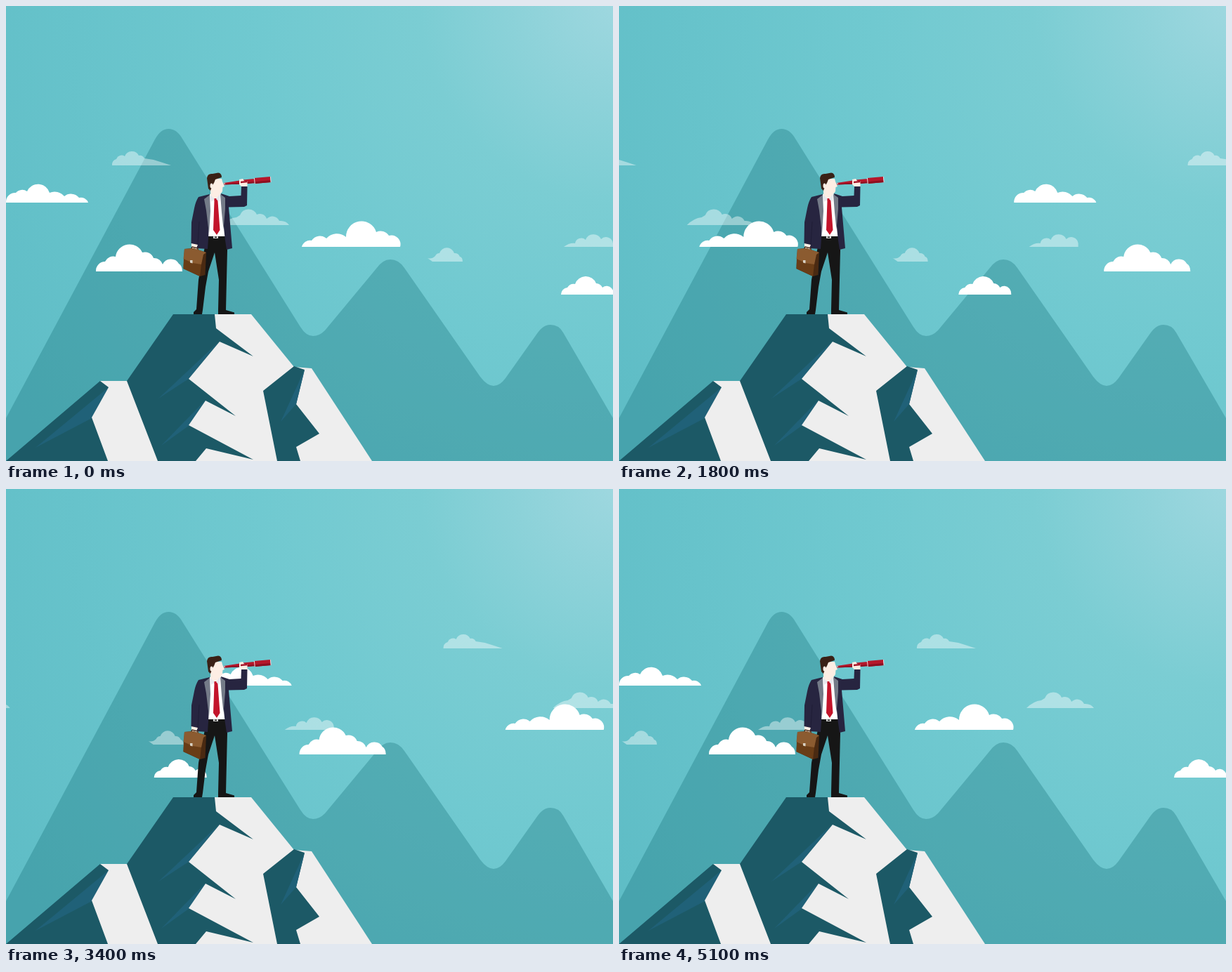
Write an HTML page that moves like this. It is 864x648 px and loops after 5.2 s.

```html
<!DOCTYPE html>
<html lang="en">
<head>
<meta charset="utf-8">
<title>Lookout</title>
<style>
html, body { margin: 0; width: 100%; height: 100%; overflow: hidden; background: #6ac4ca; }
svg { display: block; width: 100vw; height: 100vh; }
</style>
</head>
<body>
<svg viewBox="0 0 864 648" preserveAspectRatio="none">
  <defs>
    <radialGradient id="sky" gradientUnits="userSpaceOnUse" cx="880" cy="-10" r="1040">
      <stop offset="0" stop-color="#a0d8e0"/>
      <stop offset=".12" stop-color="#90d3da"/>
      <stop offset=".28" stop-color="#7bcdd3"/>
      <stop offset=".5" stop-color="#70c9d0"/>
      <stop offset=".75" stop-color="#67c3cb"/>
      <stop offset="1" stop-color="#5fbdc6"/>
    </radialGradient>
  </defs>
  <rect width="864" height="648" fill="url(#sky)"/>
  <path fill="#146e78" fill-opacity=".32" d="M0 587L212 190Q220 175 231.500 175Q243 175 251 189L419 457Q427 470 437 470Q446 470 454 462L527 374Q536 361 547 361Q559 361 567 373L675 528Q685 541 694 541Q703 541 711 530L757 465Q765 454 775 454Q787 454 793 465L864 587V648H0Z"/>
  <g id="clouds"></g>

  <g id="rock">
    <path fill="#1c5966" d="M0 648L134 534L172 534L238 439H300L352 499L446 609L420 648Z"/>
    <g fill="#206178">
      <path d="M146 543L42 629L122 587Z"/>
      <path d="M303 478L217 559L260 531Z"/>
      <path d="M283 562L221 626L260 598Z"/>
    </g>
    <g fill="#eee">
      <path d="M134 534H172L216 648H145L122 586L146 543Z"/>
      <path d="M297 439H349L410 514L435 516L521 648H270L285 630L352 646L260 597L284 562L327 584L260 531L304 478L352 499L299 459Z"/>
    </g>
    <path fill="#1c5966" d="M410 513L425 518L413 567L446 609L413 628L419 648H386L366 548Z"/>
    <path fill="#206178" d="M425 518L391 592L413 567Z"/>
  </g>

  <g id="man">
    <path fill="#161616" d="M286 327H315.500L314 390L313 433L325 436.500V439H302V433L303 390L297 351L288 378L284 400L280 433L279 439H267V436L271 432L274 390Z"/>
    <path fill="#fdeee4" d="M264 336H273L274 346L268 349L264 345Z"/>
    <path fill="#fff" d="M290 268H306L312 328H287Z"/>
    <path fill="#fdeee4" d="M291 258H304V270L298 275L291 271Z"/>
    <path fill="#c3142b" d="M296 274H300L301.500 278L304.500 319L300 326L295 319L296.500 278Z"/>
    <path fill="#272540" d="M290 268L274 272Q270 278 268 288L264 308L263.500 338L273 340L271 345L287 346Q290 310 288 285Z"/>
    <path fill="#272540" d="M306 267L318 271L334.500 270L335 257H343.500L343 284L339 286L317 286.500L322 345L314 347Q309 318 309 288Z"/>
    <path fill="none" stroke="#1f1d36" d="M273 340L275 307"/>
    <path fill="#747b88" d="M290 269L282 275L285 291L289 324L291 292ZM305 268L312 273V289L309.500 318L307 294Z"/>
    <path fill="#e7e9ee" d="M290 268L297 275L292 279ZM305 267L299 275L304 279Z"/>
    <path fill="#d0d0d0" d="M295 327.500H302V331H295Z"/>
    <path fill="#161616" d="M297 328.500H300V330H297Z"/>

    <path fill="#fdeee4" d="M290 246H307L308 250L311 257L308.500 258L308 264L305 268L297 269L290 261Z"/>
    <path fill="#3a2116" d="M288 260L286 245Q287 238 294 239L302 237.500Q307 238 307 244L298 247L296 252L294 255L291 263Z"/>
    <ellipse cx="292.500" cy="256" rx="2" ry="3.500" fill="#fdeee4"/>

    <g transform="translate(310 253) rotate(-5.200)">
      <path fill="#b5172b" d="M0 -1L23 -2.500V2.500L0 1.500ZM23 -3H44V3H23ZM44 -4H67V4H44Z"/>
      <path fill="#8c0f21" d="M0 .5H23V2.500L0 1.500ZM23 1H44V3H23ZM44 1.200H67V4H44Z"/>
      <path fill="#f0d9dc" d="M22.500 -3h1v6h-1zM43.500 -4h1v8h-1zM66.500 -4h1v8h-1z"/>
      <path fill="#cf8d95" d="M0 -1H2V1.500H0Z"/>
    </g>
    <path fill="#fdeee4" d="M332 247L337 246L339 249L343.500 249V257H335L332 254Z"/>
    <path fill="#a5162a" d="M334 249.800L343.500 248.800V251.300L334 252.300Z"/>

    <path fill="none" stroke="#3f2412" stroke-width="1.500" d="M263 347L265 343L273 345V349"/>
    <path fill="#4a2a12" d="M254 346L267 345L285 351L283.500 383L276 385L252.500 374Z"/>
    <path fill="#693d17" d="M253 358L278 368L276 385L252.500 374Z"/>
    <path fill="#8b5b30" d="M254 346L267 345L285 351L281 354L278 368L266 366L252.500 360Z"/>
    <path fill="#d9d2c4" d="M262 362H265.500V366.500L262 365.500Z"/>
  </g>
</svg>
<script>
const NS = "http://www.w3.org/2000/svg";
const LOOP = 5200, STEP = 100, SPAN = 869;
const NEAR = SPAN / 51, FAR = 596 / 51;

// start x, outline from x = 0
const far = [
  [151, "M0 227A8 8 0 0 1 6 218A8 8 0 0 1 18 214A11 11 0 0 1 38 213Q43 212 46 217L59 219Q72 223 84 227Z"],
  [307, "M0 312Q10 302 21 301L26 298A13 13 0 0 1 50 297A10 10 0 0 1 64 303A11 11 0 0 1 82 306A14 11 0 0 1 96 312Z"],
  [600, "M0 359Q6 361 11 356A7 7 0 0 1 17 352A11 11 0 0 1 38 352A8 8 0 0 1 46 357Q50 358 50 364H7Z"],
  [794, "M0 343Q8 337 16 338A9 9 0 0 1 31 333A12 12 0 0 1 53 332A10 10 0 0 1 70 338V343Z"]
];
const near = [
  [0, "M0 280A13 13 0 0 1 14 266A12 12 0 0 1 30 264A17 17 0 0 1 62 266A18 18 0 0 1 83 271A15 15 0 0 1 104 273A11 11 0 0 1 117 280Z"],
  [421, "M0 343A12 12 0 0 1 14 334A14 14 0 0 1 35 331A20 20 0 0 1 63 329A22 22 0 0 1 106 322A14 14 0 0 1 124 327A13 13 0 0 1 140 343Z"],
  [128, "M0 378A13 13 0 0 1 13 364A13 13 0 0 1 28 357A20 20 0 0 1 66 351A13 13 0 0 1 82 359A13 13 0 0 1 95 368A13 13 0 0 1 118 367Q123 370 123 378Z"],
  [790, "M0 411A10 10 0 0 1 9 401A11 11 0 0 1 20 396A16 16 0 0 1 50 395A11 11 0 0 1 59 401A9 9 0 0 1 72 402Q75 405 75 411Z"]
];

const layer = document.getElementById("clouds");

function make([start, d], speed, opacity) {
  const g = document.createElementNS(NS, "g");
  g.setAttribute("fill", "#fff");
  g.setAttribute("fill-opacity", opacity);
  for (const shift of [0, -SPAN]) {
    const p = document.createElementNS(NS, "path");
    p.setAttribute("d", d);
    p.setAttribute("transform", `translate(${shift} 0)`);
    g.append(p);
  }
  layer.append(g);
  return { g, start, speed };
}

const clouds = [
  ...far.map(c => make(c, FAR, .42)),
  ...near.map(c => make(c, NEAR, 1))
];

function draw(ms) {
  const n = Math.floor(ms % LOOP / STEP);
  for (const { g, start, speed } of clouds) {
    const x = (start - speed * n + 2 * SPAN) % SPAN;
    g.setAttribute("transform", `translate(${x.toFixed(2)} 0)`);
  }
}

const began = performance.now();
function tick() {
  draw(performance.now() - began);
  requestAnimationFrame(tick);
}
tick();
</script>
</body>
</html>
```
